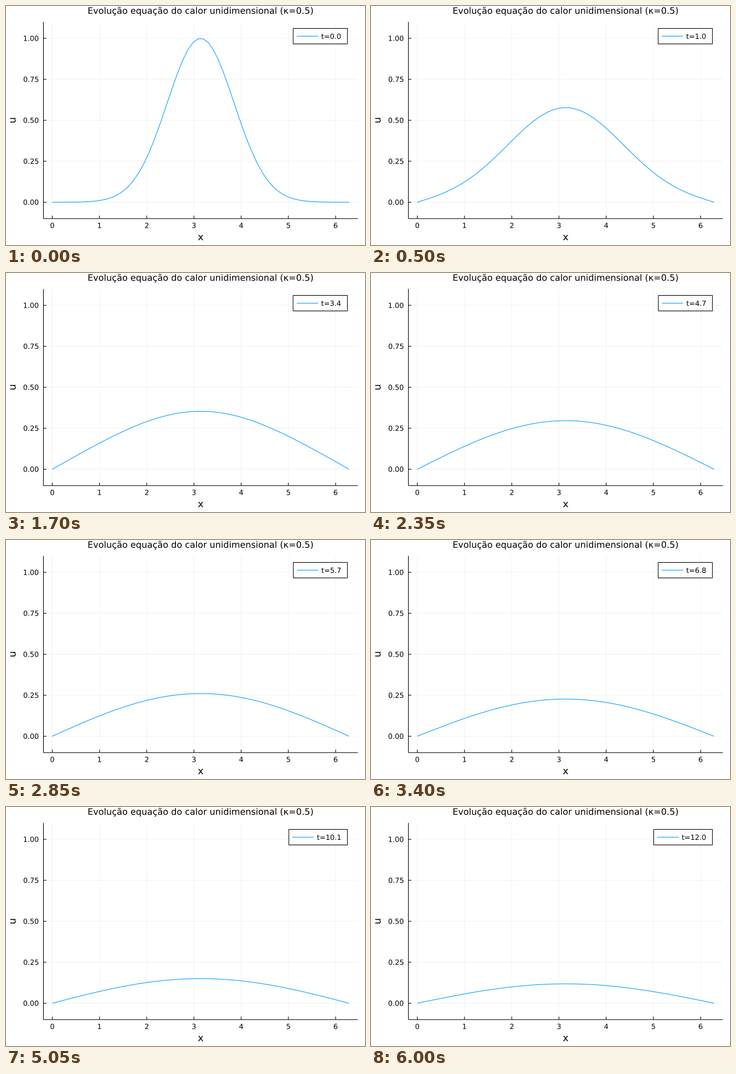
Write a matplotlib script that moves like this. It is 600 by 400 pixels and loops after 6.05 s.

```python
import numpy as np
import matplotlib.pyplot as plt
from matplotlib.animation import FuncAnimation
from matplotlib.patches import PathPatch, Rectangle
from matplotlib.textpath import TextPath
from matplotlib.transforms import Affine2D

W, H, DPI = 600, 400, 100
FRAMES, INTERVAL, DT = 121, 50, 0.1
KAPPA = 0.5
BLUE = "#009afa"
SMALL, TITLE, GUIDE = 11.85, 14.81, 16.3

plt.rcParams.update({
    "font.family": "DejaVu Sans",
    "path.snap": False,
    "lines.solid_capstyle": "butt",
})


def pt(px):
    return px * 72 / DPI


def to_px(x, u):
    """Data coordinates to stage pixels."""
    return 77.35 + 78.92 * np.asarray(x), 328.4 - 274.3 * np.asarray(u)


def heat(x, t):
    """Sine series of a Gaussian pulse cooling between two cold ends."""
    n = np.arange(1, 40, 2)
    coef = np.exp(-n**2 / 16) * np.sin(n * np.pi / 2) / np.sqrt(np.pi)
    decay = np.exp(-KAPPA * n**2 * t / 4)
    return np.sin(np.outer(x, n) / 2) @ (coef * decay)


def glyphs(x, y, s, size, anchor=0.5, angle=0):
    """Text outline on baseline y; anchor 0, 0.5 or 1 pins its left, middle or right."""
    path = TextPath((0, 0), s, size=size)
    box = path.get_extents()
    pin = box.x0 + anchor * box.width
    place = Affine2D().translate(-pin, 0).scale(1, -1).rotate_deg(angle).translate(x, y)
    return path.transformed(place)


fig = plt.figure(figsize=(W / DPI, H / DPI), dpi=DPI, facecolor="white")
ax = fig.add_axes([0, 0, 1, 1])
ax.set(xlim=(0, W), ylim=(H, 0))
ax.axis("off")


def line(xs, ys, color="black", **kw):
    return ax.plot(xs, ys, color=color, lw=pt(1), **kw)[0]


def label(*args, **kw):
    return ax.add_patch(PathPatch(glyphs(*args, **kw), fc="black", lw=0, zorder=6))


pad = 0.03 * 2 * np.pi
(left, right), (bottom, top) = to_px([-pad, 2 * np.pi + pad], [-0.1, 1.1])

for k in range(7):
    x = float(to_px(k, 0)[0])
    line([x, x], [top, bottom], alpha=0.05, zorder=1)
    line([x, x], [bottom, bottom - 5], zorder=3)
    label(x, 371.5, str(k), SMALL)

for u in np.arange(0, 1.01, 0.25):
    y = float(to_px(0, u)[1])
    line([left, right], [y, y], alpha=0.05, zorder=1)
    line([left, left + 5], [y, y], zorder=3)
    label(54.1, y + 4.3, f"{u:.2f}", SMALL, anchor=1)

line([left, left], [top, bottom], zorder=3)
line([left, right], [bottom, bottom], zorder=3)

mid_x, mid_y = (left + right) / 2, (top + bottom) / 2
label(mid_x, 13, "Evolução equação do calor unidimensional (κ=0.5)", TITLE)
label(mid_x, 392, "x", GUIDE)
label(16, mid_y, "u", GUIDE, angle=-90)

grid = np.linspace(0, 2 * np.pi, 60)
curve = line([], [], BLUE, zorder=4)

BOX_RIGHT, TEXT_RIGHT = 570.6, 559.4
box = ax.add_patch(Rectangle((480, 37.5), 91, 26, fc="white", ec="black",
                             lw=pt(1), zorder=5))
sample = line([], [], BLUE, zorder=6)
caption = label(TEXT_RIGHT, 55, "t=0.0", SMALL, anchor=1)


def update(i):
    t = i * DT
    curve.set_data(*to_px(grid, heat(grid, t)))
    # the legend grows leftwards with its text
    text = glyphs(TEXT_RIGHT, 55, f"t={t:.1f}", SMALL, anchor=1)
    x0 = text.get_extents().x0 - 47.1
    caption.set_path(text)
    box.set_x(x0)
    box.set_width(BOX_RIGHT - x0)
    sample.set_data([x0 + 6, x0 + 41.5], [50.5, 50.5])
    return curve, box, sample, caption


anim = FuncAnimation(fig, update, frames=FRAMES, interval=INTERVAL,
                     repeat=True, repeat_delay=0, blit=False)
plt.show()
```
